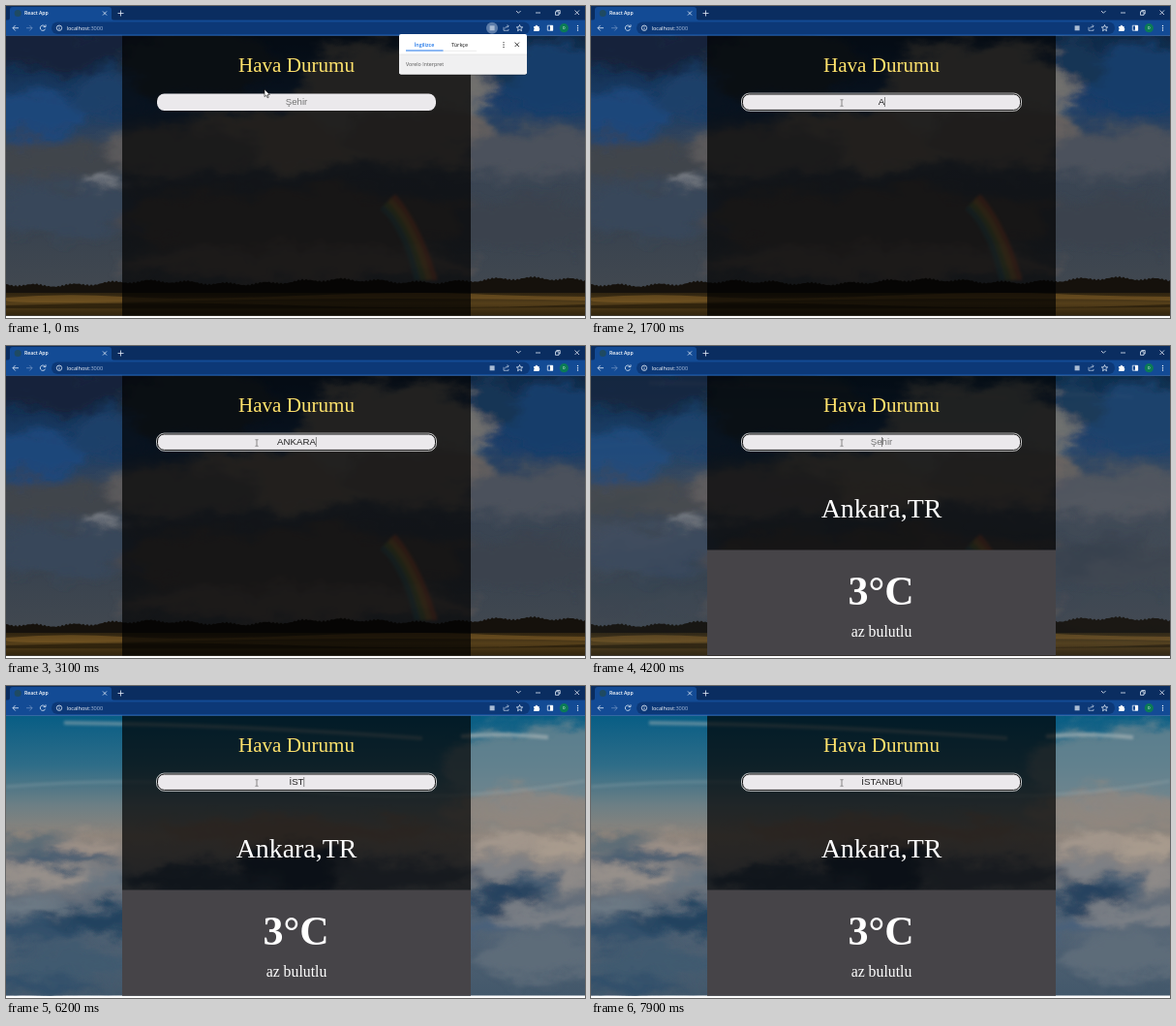
Animation of 598x322 px, one loop 8000 ms. Source, as an HTML page:

```html
<!DOCTYPE html>
<html lang="tr">
<head>
<meta charset="utf-8">
<title>Hava Durumu</title>
<style>
html, body { margin: 0; width: 100%; height: 100%; overflow: hidden; background: #fff; }
svg { display: block; width: 598px; height: 322px; }
.ui { font-family: "Open Sans", "Noto Sans", sans-serif; font-size: 5.6px; }
.serif { font-family: "Liberation Serif", "Times New Roman", serif; text-anchor: middle; }
.field { font-family: "Liberation Sans", Arial, sans-serif; font-size: 9.7px; text-anchor: middle; }
.icon { fill: none; stroke: #e4ecf8; stroke-width: .8; }
</style>
</head>
<body>
<svg id="stage" viewBox="0 0 598 322" xmlns="http://www.w3.org/2000/svg">
  <defs>
    <linearGradient id="stormSky" x2="0" y2="1">
      <stop offset="0" stop-color="#102743"/><stop offset=".25" stop-color="#1a3d68"/>
      <stop offset=".42" stop-color="#3b4655"/><stop offset=".7" stop-color="#39434f"/>
      <stop offset="1" stop-color="#454a50"/>
    </linearGradient>
    <linearGradient id="field" x2="0" y2="1">
      <stop offset="0" stop-color="#2e2310"/><stop offset=".45" stop-color="#553f1a"/>
      <stop offset="1" stop-color="#2f230d"/>
    </linearGradient>
    <linearGradient id="duskSky" x2="0" y2="1">
      <stop offset="0" stop-color="#075d85"/><stop offset=".18" stop-color="#2f6d88"/>
      <stop offset=".32" stop-color="#6c7f85"/><stop offset=".43" stop-color="#8e847b"/>
      <stop offset=".56" stop-color="#7a7b7f"/><stop offset=".72" stop-color="#556576"/>
      <stop offset="1" stop-color="#43586b"/>
    </linearGradient>
    <filter id="cloudy" x="-40" y="0" width="680" height="340" filterUnits="userSpaceOnUse">
      <feGaussianBlur stdDeviation="5.5" result="soft"/>
      <feTurbulence type="fractalNoise" baseFrequency=".022 .04" numOctaves="4" seed="6" result="noise"/>
      <feDisplacementMap in="soft" in2="noise" scale="38" xChannelSelector="R" yChannelSelector="G"/>
    </filter>
    <filter id="blur"><feGaussianBlur stdDeviation="1.8"/></filter>
    <clipPath id="page"><rect y="30.5" width="598" height="289"/></clipPath>
  </defs>

  <rect width="598" height="322" fill="#fff"/>
  <g clip-path="url(#page)">
    <g id="storm"></g>
    <g id="dusk"></g>
    <rect x="120" y="30" width="360" height="290" opacity=".7"/>
  </g>

  <text class="serif" x="300" y="68" font-size="21.1" fill="#ffe26c">Hava Durumu</text>
  <rect x="156" y="90.5" width="288" height="17.5" rx="7.5" fill="#ebe9ec"/>
  <g id="focus" fill="none">
    <rect x="155.5" y="90.1" width="289" height="18.2" rx="7.9" stroke="#f0f0f0" stroke-width=".8"/>
    <rect x="156.5" y="91" width="287" height="16.4" rx="7" stroke="#111" stroke-width="1"/>
  </g>
  <text id="query" class="field" x="300" y="102"></text>
  <rect id="caret" y="94" width=".6" height="10" fill="#444"/>

  <g id="result" class="serif" fill="#fff">
    <rect x="120" y="210.5" width="360" height="109" fill="#464448"/>
    <text x="300" y="177" font-size="27.9">Ankara,TR</text>
    <text x="299.5" y="267" font-size="42" font-weight="bold">3°C</text>
    <text x="300" y="300" font-size="15.8">az bulutlu</text>
  </g>

  <g id="browser" class="ui"></g>

  <g id="popup" class="ui">
    <rect x="406" y="30" width="132" height="41.5" rx="2" opacity=".3"/>
    <rect x="406" y="29" width="132" height="41.5" rx="2" fill="#fff"/>
    <path d="M406 50H538V68.5a2 2 0 0 1-2 2H408a2 2 0 0 1-2-2Z" fill="#f0f0f1"/>
    <path d="M406 50H538" stroke="#dcdcdc" stroke-width=".6"/>
    <path d="M451 46.3H486" stroke="#d8d8d8" stroke-width=".5"/>
    <path d="M413 46H451.5" stroke="#1a73e8" stroke-width="1"/>
    <text x="432" y="41.5" text-anchor="middle" font-weight="600" font-size="5.3" fill="#1a73e8">İngilizce</text>
    <text x="468.5" y="41.5" text-anchor="middle" font-weight="600" font-size="5.3" fill="#444">Türkçe</text>
    <g fill="#333"><circle cx="514" cy="37.6" r=".7"/><circle cx="514" cy="40" r=".7"/><circle cx="514" cy="42.4" r=".7"/></g>
    <path d="M525.6 37.6l4.4 4.4m0-4.4l-4.4 4.4" stroke="#333" stroke-width=".9"/>
    <text x="413" y="62.3" font-size="5.3" fill="#555">Vorelo Interpret</text>
  </g>

  <path id="arrow" d="M0 0V7.6L1.8 6L3.1 8.8L4.3 8.2L3 5.6H5.4Z" fill="#fff" stroke="#111" stroke-width=".6"/>
  <path id="beam" d="M-1.5-3.3H-.4L0-2.9L.4-3.3H1.5M-1.5 3.3H-.4L0 2.9L.4 3.3H1.5M0-2.9V2.9" fill="none" stroke="#444" stroke-width=".6"/>
</svg>
<script>
const $ = id => document.getElementById(id);
const LOOP = 8000, FOCUS_AT = 500, RESULT_AT = 3900;

const clouds = list => `<g filter="url(#cloudy)">` + list.map(([x, y, rx, ry, color, alpha = 1]) =>
  `<ellipse cx="${x}" cy="${y}" rx="${rx}" ry="${ry}" fill="${color}" opacity="${alpha}"/>`).join("") + "</g>";
const sky = id => `<rect y="30" width="598" height="290" fill="url(#${id})"/>`;

function treeLine() {
  let d = "M0 320";
  for (let x = 0; x <= 598; x += 2) {
    const y = 287 - x * .008 + 1.8 * Math.sin(x / 31) + 1.3 * Math.sin(x / 6.3) + .9 * Math.sin(x * 1.7);
    d += `L${x} ${y.toFixed(1)}`;
  }
  return `<path d="${d}V320Z" fill="#15110c"/>`;
}

function rainbow() {
  const bands = ["#d8643a", "#d99a3c", "#7d9a48", "#3e7c82"];
  return `<g fill="none" stroke-width="6" opacity=".5" filter="url(#blur)">` + bands.map((color, i) =>
    `<path d="M${400 - i * 4} ${196 + i * 4}Q${426 - i * 5} 226 ${443 - i * 6} 283" stroke="${color}"/>`).join("") + "</g>";
}

const streaks = `<g fill="none" stroke="#a9b4b6" filter="url(#blur)">
  <path d="M60 38Q240 40 430 54" stroke-width="4" opacity=".5"/>
  <path d="M470 52Q510 48 560 53" stroke-width="4" opacity=".7"/>
  <path d="M0 104Q150 92 300 108T598 98" stroke-width="3" opacity=".25"/></g>`;

$("storm").innerHTML = sky("stormSky") + clouds([
  [60, 42, 110, 22, "#14243a"], [20, 112, 60, 24, "#1c467a"], [105, 92, 40, 22, "#1d3f69"],
  [555, 75, 70, 38, "#153c6b"], [500, 62, 30, 26, "#173454"],
  [200, 60, 75, 38, "#233140"], [300, 135, 120, 34, "#716b64"], [400, 85, 100, 48, "#716f6d"],
  [430, 135, 80, 32, "#67625f"], [180, 150, 80, 28, "#5c5a5b"],
  [45, 158, 80, 18, "#40444c"], [545, 150, 80, 26, "#4b515b"], [300, 222, 190, 34, "#4e494a"],
  [60, 212, 80, 26, "#39465a"], [545, 225, 75, 28, "#3b424d"], [300, 265, 180, 18, "#5d5654"],
  [100, 180, 15, 6, "#83868c"]
]) + rainbow() + treeLine() +
  `<rect y="296" width="598" height="24" fill="url(#field)"/>
   <path d="M0 301Q60 296 120 300T300 299T480 297T598 300V304Q400 300 200 304T0 304Z" fill="#8a6428" opacity=".5"/>
   <path d="M0 309Q150 304 300 309T598 308V311Q300 313 0 312Z" fill="#241a09" opacity=".7"/>`;

$("dusk").innerHTML = sky("duskSky") + clouds([
  [560, 82, 110, 42, "#758891", .75], [550, 128, 100, 18, "#94897f", .8],
  [25, 160, 45, 8, "#596a76"], [85, 164, 38, 9, "#a09388"], [55, 178, 60, 8, "#425a70"],
  [40, 198, 65, 10, "#98918b"], [110, 205, 35, 12, "#677480"],
  [300, 150, 150, 12, "#8d7a6d"], [300, 190, 60, 30, "#26384d"], [200, 202, 85, 16, "#384a5d"],
  [410, 195, 80, 18, "#4d5867"],
  [510, 162, 40, 9, "#a4988d"], [575, 168, 40, 11, "#a99b8e"], [512, 186, 35, 9, "#7e8186"],
  [575, 196, 35, 12, "#8e8a88"], [517, 216, 33, 16, "#25435f"], [550, 203, 20, 9, "#455c72"],
  [500, 246, 35, 9, "#48607a"], [560, 238, 55, 12, "#7a7f85"], [555, 280, 70, 24, "#5d6c79"],
  [90, 242, 60, 15, "#21425f"], [25, 256, 55, 12, "#31506b"], [25, 228, 40, 8, "#6e7b86"],
  [70, 285, 80, 15, "#415a70"], [30, 308, 60, 10, "#32506a"], [300, 265, 160, 40, "#2d4358"]
]) + streaks;

const icon = d => `<path class="icon" d="${d}"/>`;
const dot = (x, y, r, fill) => `<circle cx="${x}" cy="${y}" r="${r}" fill="${fill}"/>`;
$("browser").innerHTML = `
  <rect width="598" height="16" fill="#0a2d60"/>
  <rect y="14.5" width="598" height="16.2" fill="#134b95"/>
  <path d="M1 15Q4 15 4 12V4Q4 1 7 1H106Q109 1 109 4V12Q109 15 112 15Z" fill="#134b95"/>
  ${dot(12.2, 7.5, 3.5, "#1f4a62")}
  <text x="19" y="9.3" font-size="5.1" font-weight="600" fill="#fff">React App</text>
  ${icon("M100 5.5l4 4m0-4l-4 4M118.5 4.5v6m-3-3h6")}
  ${icon("M527 5l2.3 2.3L531.6 5M547 7h5M567.5 5.8h3.5v3.5h-3.5zM568.7 5.8v-1.3h3.5v3.5H571M587.500 4.500l4.500 4.500m0-4.500l-4.500 4.500")}
  <rect x="47" y="16.5" width="494" height="12.5" rx="6.2" fill="#0c3877"/>
  ${icon("M13 22.7H7m2.7-2.8L7 22.7l2.7 2.8")}
  <g opacity=".4">${icon("M21 22.7h6m-2.7-2.8l2.7 2.8l-2.7 2.8")}</g>
  ${icon("M40.3 21.2a2.7 2.7 0 1 0 .3 2.4M41 19.3v2.3h-2.4")}
  ${icon("M52.3 22.7a2.7 2.7 0 1 0 5.4 0a2.7 2.7 0 1 0-5.4 0M55 22.3v2M55 20.8v.7")}
  <text x="62.5" y="24.7" font-weight="500" fill="#fff">localhost<tspan fill="#a9bddb">:3000</tspan></text>
  <circle id="halo" cx="502" cy="22.7" r="6" fill="#5b7ba8"/>
  <rect x="499.6" y="20.3" width="5" height="5" fill="#a9bbd4"/>
  <g opacity=".75">${icon("M514 21.8v3.5h5v-1.5M515.5 23.3q.3-2.5 3.5-2.5m-1.3-1.5l1.5 1.5l-1.5 1.5")}</g>
  ${icon("M530.5 19.5l.9 2.2l2.3.2l-1.8 1.5l.6 2.3l-2-1.3l-2 1.3l.6-2.3l-1.8-1.5l2.3-.2z")}
  <path d="M545 21h1.7a1.2 1.2 0 0 1 2.4 0h1.5v1.7a1.2 1.2 0 0 1 0 2.2v1.2H545v-1.6a1.1 1.1 0 0 0 0-2z" fill="#fff"/>
  ${icon("M559.3 20.2h5.4v5h-5.4z")}
  <rect x="562" y="20" width="3" height="5.4" fill="#fff"/>
  ${dot(576.3, 22.7, 4.6, "#0b7b56")}
  <text x="576.3" y="24.3" font-size="4.8" text-anchor="middle" fill="#e6f4ea">o</text>
  ${[20.4, 22.7, 25].map(y => dot(590.5, y, .7, "#fff")).join("")}`;

const typed = [
  { text: "ANKARA", keys: [1600, 1900, 2150, 2400, 2650, 2900], until: RESULT_AT },
  { text: "İSTANBU", keys: [5600, 5850, 6100, 6500, 6900, 7250, 7650], until: LOOP }
];
const clamp = v => Math.min(1, Math.max(0, v));
const ease = v => v * v * (3 - 2 * v);
const show = (id, on) => $(id).setAttribute("visibility", on ? "visible" : "hidden");

function drawField(t) {
  let text = "", lastEdit = t >= RESULT_AT ? RESULT_AT : FOCUS_AT;
  for (const { text: word, keys, until } of typed) {
    const count = keys.filter(k => k <= t).length;
    if (count && t < until) {
      text = word.slice(0, count);
      lastEdit = keys[count - 1];
    }
  }
  const query = $("query");
  query.textContent = text || "Şehir";
  query.setAttribute("fill", text ? "#222" : "#757575");
  $("caret").setAttribute("x", 300 + (text ? query.getComputedTextLength() / 2 : 0));
  show("caret", t >= FOCUS_AT && (t - lastEdit) % 1000 < 500);
}

function draw(t) {
  const move = ease(clamp((t - 50) / 350));
  const x = 267 - 8 * move, y = 86 + 14 * move;
  const overField = y > 91;
  $("arrow").setAttribute("transform", `translate(${x} ${y})`);
  $("beam").setAttribute("transform", `translate(${x} ${y})`);
  show("arrow", !overField);
  show("beam", overField);
  show("popup", t < FOCUS_AT);
  show("halo", t < FOCUS_AT);
  show("focus", t >= FOCUS_AT);
  show("result", t >= RESULT_AT);
  const fade = ease(clamp((t - 4000) / 1100));
  $("dusk").setAttribute("opacity", fade);
  show("dusk", fade > 0);
  show("storm", fade < 1);
  drawField(t);
}

const start = performance.now();
function tick() {
  draw((performance.now() - start) % LOOP);
  requestAnimationFrame(tick);
}
tick();
</script>
</body>
</html>
```
